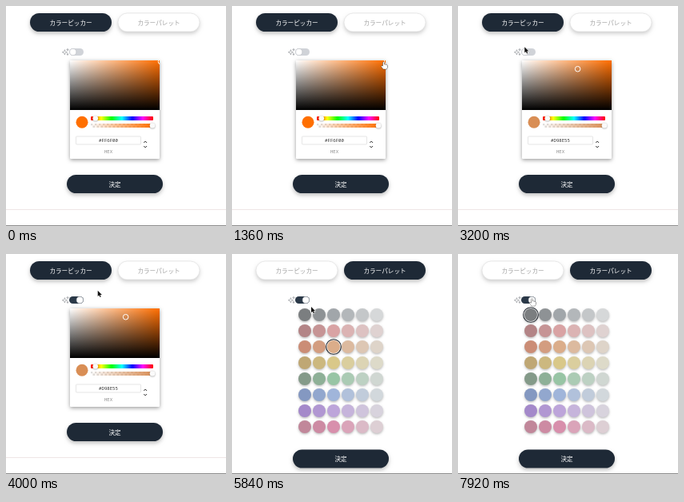
Recreate the animation shown at these times as an HTML page with a canvas. Size 275 by 275 pixels, loop 8000 ms.

```html
<!DOCTYPE html>
<html>
<head>
<meta charset="utf-8">
<style>
html, body { margin: 0; width: 100%; height: 100%; overflow: hidden; background: #fff; }
canvas { display: block; width: 275px; height: 275px; }
</style>
</head>
<body>
<canvas id="stage"></canvas>
<script>
const SIZE = 275, LOOP = 8000, DARK = '#1e2936', HUE = 26;
const SANS = '"Noto Sans CJK JP", "Noto Sans CJK", sans-serif';
const MONO = '"Noto Sans Mono", monospace';
const canvas = document.getElementById('stage');
const c = canvas.getContext('2d');
const dpr = window.devicePixelRatio || 1;
canvas.width = canvas.height = SIZE * dpr;

// Each palette row runs from dark through middle to light.
const ROWS = [
  ['#7b7e80', '#a1a6aa', '#d6d8d9'],
  ['#b38486', '#d9a3a4', '#dfd2d1'],
  ['#cb8d76', '#dbad8a', '#ded4c9'],
  ['#bfa774', '#d9c889', '#dddac9'],
  ['#849a89', '#98c5a5', '#d0d7d2'],
  ['#8498c1', '#a0b5da', '#d2d8dc'],
  ['#a489ca', '#bda5da', '#d8d3dd'],
  ['#c1879a', '#d88fac', '#ddcfd4']
];

// Cursor: time, x, y, shape; positions ease from key to key.
const CURSOR = [
  [900, 212, 112, 'arrow'], [1280, 189.5, 70, 'hand'], [1760, 189.5, 70, 'hand'],
  [2480, 149, 78, 'hand'], [2700, 149, 78, 'arrow'], [3180, 83, 51, 'arrow'],
  [3320, 87, 56, 'hand'], [3800, 87, 56, 'arrow'], [4380, 187, 19, 'hand'],
  [5100, 187, 19, 'arrow'], [5750, 99, 66, 'arrow'], [5900, 99, 66, 'arrow'],
  [6350, 91, 73, 'arrow'], [7200, 91, 73, 'arrow'], [7650, 92.5, 56, 'hand'],
  [8000, 92.5, 56, 'hand']
];

const mix = (a, b, k) => a + (b - a) * k;
const ease = k => k * k * (3 - 2 * k);
const ramp = (t, from, to) => ease(Math.min(1, Math.max(0, (t - from) / (to - from))));

function mixHex(a, b, k) {
  const part = (h, i) => parseInt(h.slice(i, i + 2), 16);
  return `rgb(${[1, 3, 5].map(i => Math.round(mix(part(a, i), part(b, i), k)))})`;
}

function hsvHex(s, v) {
  const channel = n => {
    const k = (n + HUE / 60) % 6;
    const x = v - v * s * Math.max(0, Math.min(k, 4 - k, 1));
    return Math.round(x * 255).toString(16).padStart(2, '0');
  };
  return ('#' + channel(5) + channel(3) + channel(1)).toUpperCase();
}

function paint(fill, stroke, width = 1) {
  if (fill) { c.fillStyle = fill; c.fill(); }
  c.shadowColor = 'transparent';
  if (stroke) { c.strokeStyle = stroke; c.lineWidth = width; c.stroke(); }
}

function box(x, y, w, h, r, fill, stroke, width) {
  c.beginPath();
  c.roundRect(x, y, w, h, r);
  paint(fill, stroke, width);
}

function disc(x, y, r, fill, stroke, width) {
  c.beginPath();
  c.arc(x, y, r, 0, 7);
  paint(fill, stroke, width);
}

function line(points, color, width) {
  c.beginPath();
  points.forEach(p => c.lineTo(...p));
  paint(null, color, width);
}

function shadow(alpha, blur, dy) {
  c.shadowColor = `rgba(0,0,0,${alpha})`;
  c.shadowBlur = blur * dpr;
  c.shadowOffsetY = dy * dpr;
}

function label(text, x, y, size, color, font = SANS) {
  c.font = `${size}px ${font}`;
  c.fillStyle = color;
  c.fillText(text, x, y);
}

function gradient(x0, y0, x1, y1, colors) {
  const g = c.createLinearGradient(x0, y0, x1, y1);
  colors.forEach((color, i) => g.addColorStop(i / (colors.length - 1), color));
  return g;
}

function pill(text, x, y, w, active) {
  shadow(active ? 0.25 : 0.2, 5, 2.5);
  box(x, y, w, 23, 11.5, active ? DARK : '#fff', active ? null : '#dcdcdc', 0.6);
  label(text, x + w / 2, y + 12, 7.6, active ? '#fff' : '#a3a3a3');
}

function sparkle(x, y, r) {
  c.beginPath();
  c.moveTo(x, y - r);
  [[r, 0], [0, r], [-r, 0], [0, -r]].forEach(([dx, dy]) =>
    c.quadraticCurveTo(x, y, x + dx, y + dy));
  paint('#fff', '#8b8f94', 0.6);
}

function toggle(k) {
  sparkle(73.4, 57.8, 3.2);
  sparkle(77, 54.6, 1.3);
  sparkle(77, 60.4, 1.1);
  box(79, 53, 18, 9, 4.5, mixHex('#d0d3d8', '#2b3948', k));
  disc(mix(83.7, 92.3, k), 57.5, 4.1, '#fff', '#b9bdc2', 0.6);
}

function picker(t) {
  const k = ramp(t, 1760, 2480);
  const s = mix(1, 0xD9 - 0x55, k === 1 ? 1 : 0) > 1 ? (0xD9 - 0x55) / 0xD9 : mix(1, 132 / 217, k);
  const v = mix(1, 217 / 255, k);
  const color = k === 1 ? '#D98E55' : hsvHex(s, v);

  shadow(0.4, 5, 1.5);
  box(80, 68, 112, 123, 1, '#fff');
  c.save();
  c.beginPath();
  c.rect(80, 68, 112, 62);
  c.clip();
  [gradient(80, 0, 192, 0, ['#fff', '#ff6e00']),
   gradient(0, 68, 0, 130, ['rgba(0,0,0,0)', '#000'])].forEach(fill => {
    c.fillStyle = fill;
    c.fillRect(80, 68, 112, 62);
  });
  disc(81.5 + 112 * s, 69.5 + 62 * (1 - v), 3.3, null, '#fff', 1);
  c.restore();

  disc(95, 145.3, 7.5, color);
  const hues = [0, 60, 120, 180, 240, 300, 360].map(h => `hsl(${h},100%,50%)`);
  box(106, 138, 78, 5, 1, gradient(106, 0, 184, 0, hues));
  for (let i = 0; i < 62; i++) {
    const col = i >> 1, row = i % 2;
    c.fillStyle = (col + row) % 2 ? '#fff' : '#dedede';
    c.fillRect(106 + col * 78 / 31, 147 + row * 2.5, 78 / 31, 2.5);
  }
  box(106, 147, 78, 5, 1, gradient(106, 0, 184, 0, [color + '00', color]));
  [[111.8, 140.5], [183, 149.5]].forEach(([x, y]) => {
    shadow(0.4, 2, 0.5);
    disc(x, y, 3.3, '#fafafa');
  });

  box(87.5, 163, 81, 10, 1, '#fff', '#d6d6d6', 0.6);
  label(color, 128, 168.3, 5.7, '#333', MONO);
  label('HEX', 128, 182.2, 5.7, '#858585', MONO);
  line([[172.3, 171], [174.2, 169], [176.1, 171]], '#333', 1);
  line([[172.3, 175], [174.2, 177], [176.1, 175]], '#333', 1);
}

function palette(t) {
  const first = t >= 6450;
  ROWS.forEach(([dark, mid, light], row) => {
    for (let col = 0; col < 6; col++) {
      const x = 91 + col * 18, y = 76 + row * 20;
      const color = col < 2 ? mixHex(dark, mid, col / 2) : mixHex(mid, light, (col - 2) / 3);
      const chosen = first ? !row && !col : row === 2 && col === 2;
      shadow(0.28, 3, 1.3);
      if (chosen) disc(x, y, 9.3, '#fff', '#252b32', 1.1);
      disc(x, y, 8, color);
    }
  });
}

const ARROW = new Path2D('M0 0V7.2L1.7 5.7L2.8 8.2L4 7.7L2.9 5.3H5.2Z');
const HAND = new Path2D('M-.8 .6Q0 -.5 .8 .6V3.2Q1.6 2.6 2.2 3.4Q3 2.9 3.5 3.8Q4.8 3.5 4.8 4.7' +
  'Q4.8 7 3.8 8.8H-.6Q-1.2 7.2 -3 5.4Q-2.6 4.2 -.8 5.4Z');

function cursor(t) {
  if (t < CURSOR[0][0]) return;
  const i = CURSOR.findIndex(key => key[0] > t);
  const [t0, x0, y0, shape] = CURSOR[i - 1], [t1, x1, y1] = CURSOR[i];
  const k = ramp(t, t0, t1), hand = shape === 'hand';
  const path = hand ? HAND : ARROW;
  c.save();
  c.translate(mix(x0, x1, k), mix(y0, y1, k));
  c.lineJoin = 'round';
  c.lineWidth = hand ? 0.8 : 1.2;
  c.strokeStyle = hand ? '#222' : '#fff';
  c.fillStyle = hand ? '#fff' : '#111';
  c.stroke(path);
  c.fill(path);
  c.restore();
}

function draw(t) {
  const onPalette = t >= 4480;
  c.setTransform(dpr, 0, 0, dpr, 0, 0);
  c.fillStyle = '#fff';
  c.fillRect(0, 0, SIZE, SIZE);
  c.textAlign = 'center';
  c.textBaseline = 'middle';
  pill('カラーピッカー', 30, 9, 102, !onPalette);
  pill('カラーパレット', 140, 9, 102, onPalette);
  toggle(ramp(t, 3480, 3640));
  if (onPalette) {
    palette(t);
  } else {
    picker(t);
    c.fillStyle = '#eee6e6';
    c.fillRect(0, 254, SIZE, 1);
  }
  pill('決定', 76, onPalette ? 244.5 : 211, 120, true);
  c.fillStyle = '#8d8d8d';
  c.fillRect(0, 274, SIZE, 1);
  cursor(t);
}

const start = performance.now();
function tick() {
  draw((performance.now() - start) % LOOP);
  requestAnimationFrame(tick);
}
tick();
</script>
</body>
</html>
```
